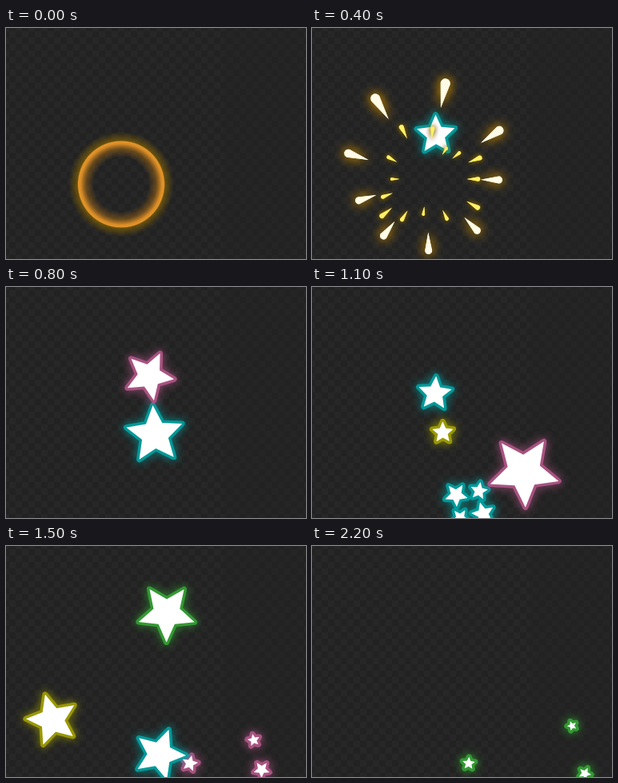
Write an HTML page with a canvas that moves like this. It is 375x289 px and loops after 2300 ms.

```html
<!DOCTYPE html>
<html lang="en">
<head>
<meta charset="utf-8">
<title>Star fireworks</title>
<style>
html, body { margin: 0; width: 100%; height: 100%; overflow: hidden; background: #222; }
canvas { display: block; }
</style>
</head>
<body>
<canvas id="stage" width="375" height="289"></canvas>
<script>
const ctx = document.getElementById('stage').getContext('2d');
const STEP = 100, STEPS = 23, LAUNCH_Y = 196, FLOOR = 283, BURST_Y = 272, BIT_LIFE = 4;
const CYAN = '#00a4a4', PINK = '#b5588a', YELLOW = '#a5a300', GREEN = '#35a535';

// launch and land are in steps, rise is the bend of the arc, spin the degrees turned in flight
const flights = [
  { color: CYAN, launch: 2.6, land: 9.4, from: 144, to: 197, rise: 123, size: 37, spin: -5, bits: 4, spread: 62 },
  { color: PINK, launch: 7.05, land: 11.35, from: 152, to: 275, rise: 151, size: 45, spin: 115, bits: 3, spread: 57 },
  { color: CYAN, launch: 10, land: 15.2, from: 144, to: 194, rise: 128, size: 33, spin: 21, bits: 4, spread: 76 },
  { color: YELLOW, launch: 10.83, land: 15.6, from: 168, to: 42, rise: 124, size: 33, spin: -18, bits: 3, spread: 26 },
  { color: GREEN, launch: 12.5, land: 18, from: 144, to: 269, rise: 153, size: 41, spin: 80, bits: 3, spread: 79 }
];

const rad = deg => deg * Math.PI / 180;

function starPath({ x, y, r, turn }) {
  ctx.beginPath();
  for (let i = 0; i < 10; i++) {
    const a = rad(turn - 90 + i * 36), d = i % 2 ? r * 0.47 : r;
    ctx.lineTo(x + d * Math.cos(a), y + d * Math.sin(a));
  }
  ctx.closePath();
}

// The flying star until it lands, then its scattering bits
function starsOf({ color, launch, land, from, to, rise, size, spin, bits, spread }, t) {
  const burst = Math.ceil(land), age = t - burst;
  if (t < launch || age > BIT_LIFE) return [];
  if (age <= 0) {
    const u = Math.min(1, (t - launch) / (land - launch));
    return [{
      color,
      x: from + (to - from) * u,
      y: LAUNCH_Y + (FLOOR - LAUNCH_Y) * u - 4 * rise * u * (1 - u),
      r: size * (1 - 0.65 * (1 - u) ** 3),
      turn: spin * u
    }];
  }
  const reach = spread * (1 - (1 - age / 5.5) ** 2);
  return Array.from({ length: bits }, (_, i) => {
    const a = rad(bits === 4 ? 215 + 90 * i : 180 + 95 * i + 45 * (i % 2));
    return {
      color,
      x: to + reach * Math.cos(a),
      y: BURST_Y + reach * Math.sin(a),
      r: (i % 2 ? 13 : 17) * (1 - 0.13 * age),
      turn: 43 - 24 * i - 10 * age
    };
  });
}

function drawStars(stars) {
  ctx.lineJoin = 'round';
  ctx.lineWidth = 7;
  ctx.globalAlpha = 0.85;
  for (const star of stars) {
    starPath(star);
    ctx.strokeStyle = ctx.shadowColor = star.color;
    ctx.shadowBlur = 12;
    ctx.stroke();
  }
  ctx.globalAlpha = 1;
  ctx.shadowBlur = 0;
  ctx.fillStyle = '#fff';
  for (const star of stars) {
    starPath(star);
    ctx.fill();
  }
}

function drawDrop(angle, reach, length, width, t) {
  const grow = t < 4 ? 1 - ((4 - t) / 4) ** 2 : 1;
  const size = t < 4 ? grow : 1 - (t - 4) * 0.35;
  const tip = reach * grow, w = width * size / 2;
  ctx.save();
  ctx.translate(144, 189);
  ctx.rotate(rad(angle));
  ctx.beginPath();
  ctx.moveTo(tip - length * size, 0);
  ctx.lineTo(tip - w, -w);
  ctx.arc(tip - w, 0, w, -Math.PI / 2, Math.PI / 2);
  ctx.closePath();
  ctx.fill();
  ctx.fill();
  ctx.restore();
}

function drawDrops(t) {
  ctx.fillStyle = '#fffbe6';
  ctx.shadowColor = '#b07a00';
  ctx.shadowBlur = 14;
  for (let i = 0; i < 9; i++) {
    const angle = 40 * i + 3 + 6 * Math.sin(0.9 * i - 0.4);
    const reach = 94 + 35 * Math.max(0, Math.cos(rad(40 * i - 265)));
    drawDrop(angle, reach, reach * 0.29, reach * 0.095, t);
  }
  ctx.fillStyle = '#fff066';
  ctx.shadowColor = '#806000';
  ctx.shadowBlur = 6;
  for (let i = 0; i < 14; i++) {
    const angle = 360 / 14 * i + 20 * Math.sin(Math.PI * i / 7) ** 2;
    const reach = 61 + 15 * Math.cos(1.5 * (i - 5));
    drawDrop(angle, reach, reach * 0.25, reach * 0.08, t);
  }
  ctx.shadowBlur = 0;
}

function drawRing() {
  const g = ctx.createRadialGradient(144, 195.5, 34, 144, 195.5, 66);
  const stop = (at, rgb, alpha) => g.addColorStop(at, `rgba(${rgb},${alpha})`);
  stop(0, '190,120,20', 0);
  stop(0.3, '190,120,20', 0.42);
  stop(0.52, '225,145,40', 0.95);
  stop(0.61, '230,150,40', 1);
  stop(0.65, '150,110,0', 0.6);
  stop(1, '130,100,0', 0);
  ctx.fillStyle = g;
  ctx.fillRect(70, 120, 150, 150);
}

function drawBackground() {
  ctx.fillStyle = '#222';
  ctx.fillRect(0, 0, 375, 289);
  ctx.fillStyle = '#272727';
  const cell = 8;
  for (let row = 0; row < 37; row++)
    for (let col = row % 2; col < 48; col += 2)
      ctx.fillRect(col * cell - 4, row * cell - 4, cell, cell);
  ctx.fillStyle = 'rgba(36,36,36,.4)';
  ctx.fillRect(272, 0, 103, 289);
}

function frame() {
  const t = Math.floor(performance.now() / STEP) % STEPS;
  drawBackground();
  if (t === 0) drawRing();
  drawStars(flights.flatMap(flight => starsOf(flight, t)));
  if (t >= 1 && t <= 6) drawDrops(t);
  requestAnimationFrame(frame);
}
frame();
</script>
</body>
</html>
```
